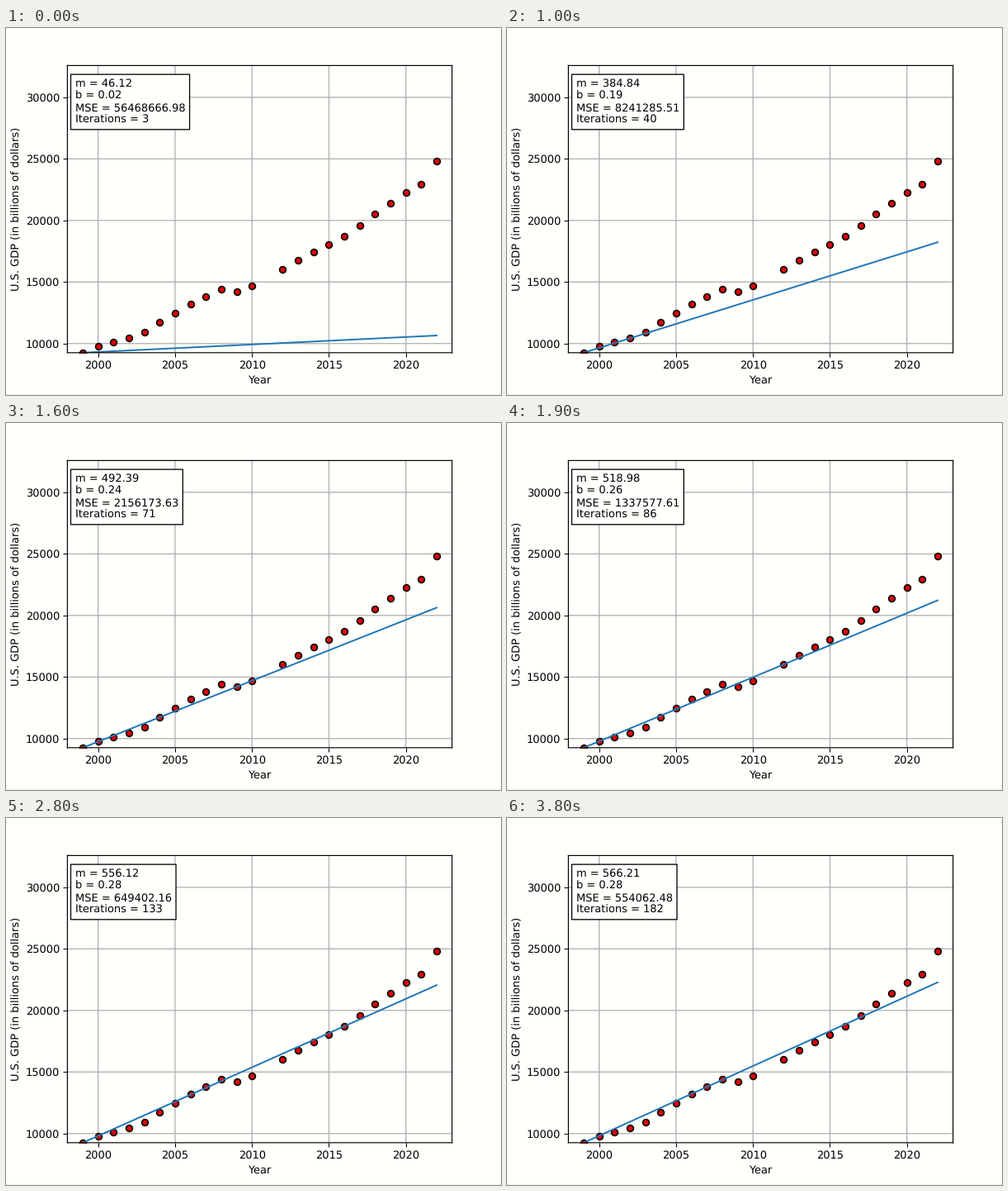
These frames come from a looping animation (600x444 px, 3900 ms). A matplotlib script:

```python
import numpy as np
import matplotlib.pyplot as plt
from matplotlib.animation import FuncAnimation
from matplotlib.patches import Rectangle

W, H = 600, 444
FRAMES, INTERVAL = 39, 100
PAPER = "#fffffc"
S = 0.94  # overall scale of the default matplotlib look

plt.rcParams.update({
    "font.family": "DejaVu Sans",
    "font.size": 10 * S,
    "text.hinting": "none",
    "text.hinting_factor": 1,
    "path.snap": False,
    "axes.linewidth": 0.9 * S,
    "axes.labelpad": 4 * S,
    "grid.linewidth": S,
    "grid.color": "#b0b0b0",
    "lines.linewidth": 1.5 * S,
    "patch.linewidth": S,
})
for axis in ("xtick", "ytick"):
    plt.rcParams.update({
        f"{axis}.major.size": 3.5 * S,
        f"{axis}.major.pad": 3.5 * S,
        f"{axis}.major.width": 0.8 * S,
    })

# GDP grows evenly between its turning points; 2011 is missing
turns = {1999: 9270, 2000: 9812, 2002: 10456, 2003: 10939, 2006: 13233,
         2008: 14393, 2009: 14246, 2010: 14708, 2014: 17405, 2016: 18686,
         2020: 22301, 2021: 22925, 2022: 24809}
years = np.array([y for y in range(1999, 2023) if y != 2011])
gdp = np.interp(years, list(turns), list(turns.values()))
BASE = 9256

# Gradient descent: the slope closes in on its limit geometrically
LIMIT, RATE = 569.607, 0.028146
B_RATIO = 0.0004955
MSE_CURVE = 62383600, 3534000, 530781  # quadratic in the remaining share

# Pace of the run: (step, iterations reached)
pace = [(0, 3), (6, 24), (10, 40), (16, 71), (23, 105), (28, 133), (38, 182)]


def remaining(n):
    return np.exp(-RATE * n)


def slope(n):
    return LIMIT * (1 - remaining(n))


fig = plt.figure(figsize=(W / 100, H / 100), dpi=100, facecolor=PAPER)
left, top = 74.4, 45.4
width, height = 496 * S, 369.6 * S
ax = fig.add_axes([left / W, 1 - (top + height) / H, width / W, height / H],
                  facecolor=PAPER)
ax.set(xlim=(1998, 2023), ylim=(BASE, 32582),
       xlabel="Year", ylabel="U.S. GDP (in billions of dollars)")
ax.set_xticks(range(2000, 2021, 5))
ax.set_yticks(range(10000, 30001, 5000))
ax.grid(True)
ax.set_axisbelow(True)

ax.scatter(years, gdp, s=36 * S * S, c="#dd0000", edgecolors="black",
           linewidths=1.2 * S, zorder=1)
line, = ax.plot([], [], color="#1f77b4")
label = ax.text(0.02, 0.8, "", transform=ax.transAxes,
                bbox=dict(facecolor=PAPER, edgecolor="black", pad=4 * S))

# faint strip along the bottom edge
fig.add_artist(Rectangle((0, 0), 1, 1.5 / H, color="#f1f1f6", lw=0))


def update(i):
    n = int(round(np.interp(i, *zip(*pace))))
    m = slope(n)
    mse = np.polyval(MSE_CURVE, remaining(n))
    # the line is already one update ahead of the readout
    line.set_data(years, BASE + slope(n + 1) * (years - years[0]))
    label.set_text(f"m = {m:.2f}\nb = {m * B_RATIO:.2f}\n"
                   f"MSE = {mse:.2f}\nIterations = {n}")
    return line, label


anim = FuncAnimation(fig, update, frames=FRAMES, interval=INTERVAL,
                     init_func=lambda: update(0), repeat=True, repeat_delay=0)
plt.show()
```
